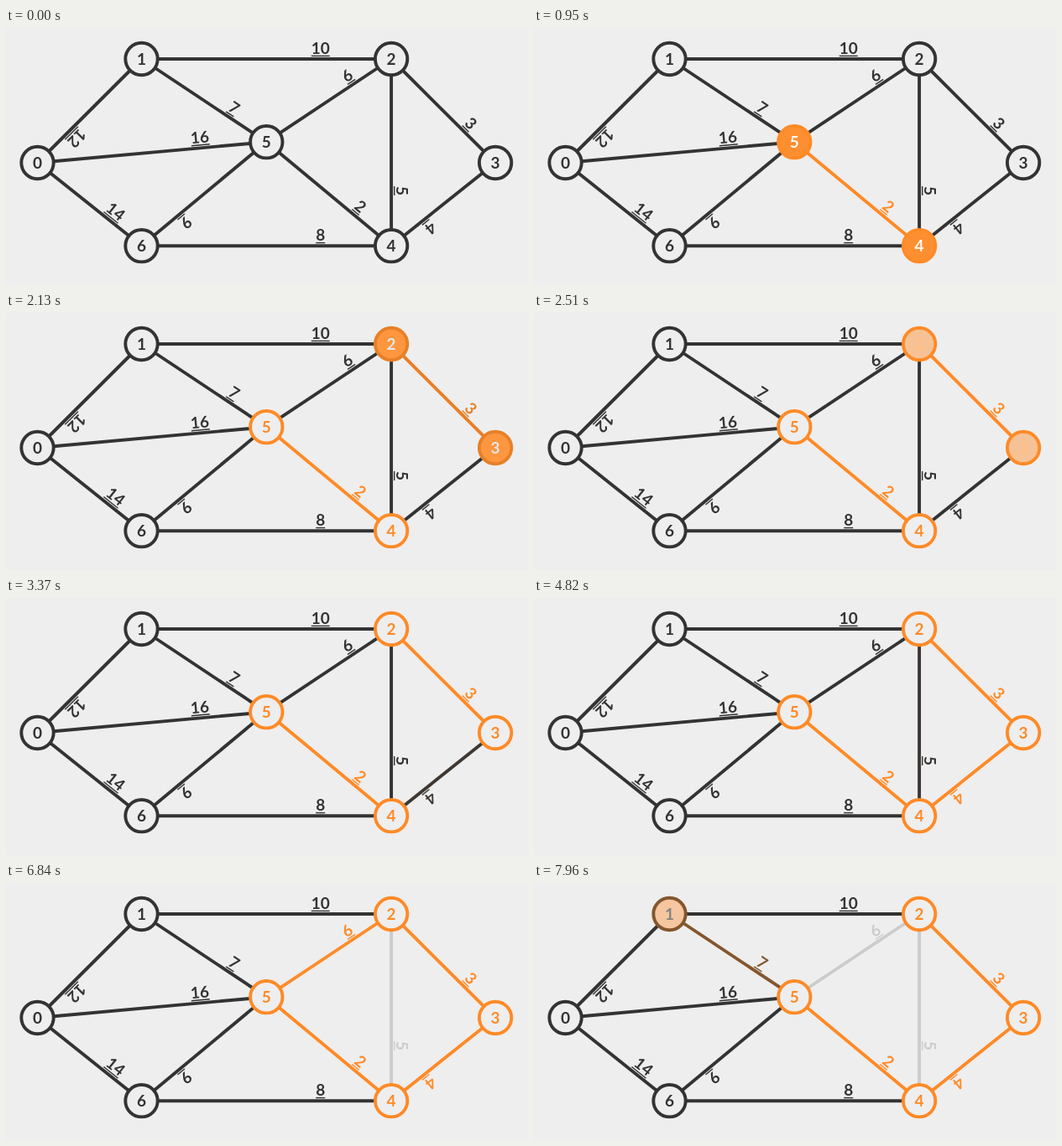
Write an HTML page that moves like this. It is 622 px wide and 307 px high and loops after 8000 ms.

```html
<!DOCTYPE html>
<html lang="en">
<head>
<meta charset="utf-8">
<title>Minimum spanning tree</title>
<style>
  html, body { margin: 0; width: 100%; height: 100%; overflow: hidden; background: #eee; }
  svg { display: block; width: 622px; height: 307px; }
  text { font: 700 19px Lato, "Open Sans", sans-serif; text-anchor: middle; }
</style>
</head>
<body>
<svg id="stage" viewBox="0 0 622 307"></svg>
<script>
const LOOP = 8000, FADE = 470, SETTLE = 460, REJECT = 530;
const GRID = 124, LEFT = 37.5, TOP = 37, RADIUS = 19.2, STROKE = 3.9;
const PAPER = [238, 238, 238], INK = [51, 51, 51], ORANGE = [255, 138, 39],
      WHITE = [255, 255, 255], GREY = [204, 204, 204];

// Node places in grid units, then "from-to:weight" for every edge
const nodes = "0,1 1,0 3.4,0 4.4,1 3.4,1.8 2.2,.8 1,1.8".split(" ").map((place, id) => {
  const [u, v] = place.split(",");
  return { id, x: LEFT + u * GRID, y: TOP + v * GRID, root: id };
});
const edges = "1-0:12 0-5:16 0-6:14 1-2:10 5-6:9 6-4:8 1-5:7 5-2:6 2-4:5 3-4:4 2-3:3 5-4:2"
  .split(" ").map(spec => {
    const [from, to, weight] = spec.split(/[-:]/);
    return { from: nodes[from], to: nodes[to], weight };
  });

// Kruskal: lightest edge first, rejected when both ends are already joined
function schedule() {
  [...edges].sort((a, b) => a.weight - b.weight).forEach((edge, i) => {
    const { from, to } = edge;
    edge.on = 383 + i * (1412 + 12 * i);
    if (from.root === to.root) {
      edge.off = edge.on + REJECT;
      return;
    }
    for (const node of [from, to]) node.on ??= edge.on;
    const old = from.root;
    for (const node of nodes) if (node.root === old) node.root = to.root;
  });
}

const stage = document.getElementById("stage");

function add(parent, tag, attrs, label) {
  const el = document.createElementNS("http://www.w3.org/2000/svg", tag);
  for (const key in attrs) el.setAttribute(key, attrs[key]);
  if (label !== undefined) el.textContent = label;
  return parent.appendChild(el);
}

function buildEdge(edge) {
  const { from, to, weight } = edge;
  const dx = to.x - from.x, dy = to.y - from.y;
  const length = Math.hypot(dx, dy);
  const angle = Math.atan2(dy, dx) * 180 / Math.PI;
  const at = 0.75 * length - 10;
  const half = weight.length * 5.5;
  edge.group = add(stage, "g", { transform: `translate(${from.x} ${from.y}) rotate(${angle})` });
  add(edge.group, "line", { x2: length, "stroke-width": STROKE });
  add(edge.group, "text", { x: at, y: -6, stroke: "none" }, weight);
  add(edge.group, "line", { x1: at - half, x2: at + half, y1: -3.6, y2: -3.6, "stroke-width": 1.4 });
}

function buildNode(node) {
  const { id, x, y } = node;
  node.disc = add(stage, "circle", { cx: x, cy: y, r: RADIUS, "stroke-width": STROKE });
  node.label = add(stage, "text", { x, y: y + 6.8 }, id);
}

function ease(time, start = Infinity) {
  const p = Math.min(1, Math.max(0, (time - start) / FADE));
  return p < 0.5 ? 4 * p ** 3 : 1 - 4 * (1 - p) ** 3;
}

const mix = (a, b, p) => a.map((v, i) => v + (b[i] - v) * p);
const css = c => `rgb(${c.map(Math.round).join(",")})`;

function draw(time) {
  for (const { group, on, off } of edges) {
    const color = css(mix(mix(INK, ORANGE, ease(time, on)), GREY, ease(time, off)));
    group.setAttribute("stroke", color);
    group.setAttribute("fill", color);
  }
  for (const { disc, label, on } of nodes) {
    const p = ease(time, on), q = ease(time, on + SETTLE);
    disc.setAttribute("stroke", css(mix(INK, ORANGE, p)));
    disc.setAttribute("fill", css(mix(mix(PAPER, ORANGE, p), PAPER, q)));
    label.setAttribute("fill", css(mix(mix(INK, WHITE, p), ORANGE, q)));
  }
}

schedule();
edges.forEach(buildEdge);
nodes.forEach(buildNode);

const begin = performance.now();
function tick() {
  draw((performance.now() - begin) % LOOP);
  requestAnimationFrame(tick);
}
tick();
</script>
</body>
</html>
```
